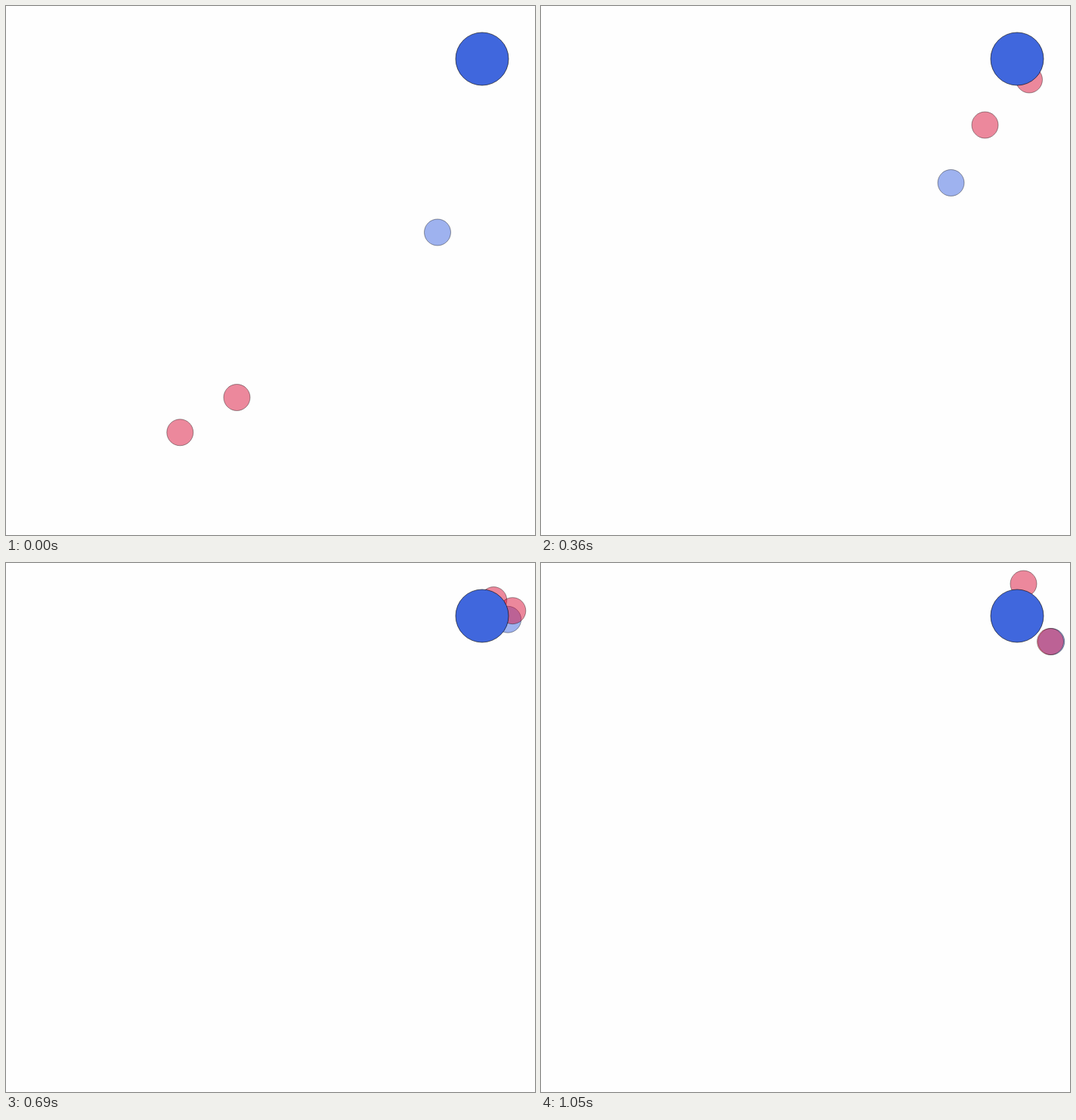
Recreate the animation shown at these times as an HTML page with a canvas. Size 700 by 700 pixels, loop 1080 ms.

```html
<!DOCTYPE html>
<html lang="en">
<head>
<meta charset="utf-8">
<title>Swarm</title>
<style>
html, body { margin: 0; height: 100%; overflow: hidden; background: #fefefe; }
canvas { display: block; }
</style>
</head>
<body>
<canvas id="stage" width="700" height="700"></canvas>
<script>
const ctx = document.getElementById('stage').getContext('2d');
const STEP = 30, LOOP = 1080;
const BLUE = '65,105,225', RED = '220,20,60';

// Key points of each flight, reached at these steps
const steps = [0, 3, 8, 12, 19, 28, 35];
const particles = [
  { color: BLUE, x: [571, 501.5, 457, 542.5, 654, 655.6, 675.3], y: [299.5, 378, 289.5, 234, 91, 89, 104] },
  { color: RED, x: [305.5, 375.5, 511, 646, 669, 613, 638.5], y: [518, 401.5, 219, 97.5, 56, 46, 27.5] },
  { color: RED, x: [230.3, 301.5, 451, 587.5, 683, 638, 674], y: [564.3, 448, 277.5, 157.5, 74.5, 73, 104] }
];

const rate = (p, i) => (p[i + 1] - p[i]) / (steps[i + 1] - steps[i]);

function slope(p, i) {
  if (i === 0) return 2 * rate(p, 0) - slope(p, 1);
  if (i === p.length - 1) return rate(p, i - 1);
  const before = steps[i] - steps[i - 1], after = steps[i + 1] - steps[i];
  return (after * rate(p, i - 1) + before * rate(p, i)) / (before + after);
}

// Cubic Hermite curve through the key points
function glide(p, n) {
  const i = steps.findLastIndex((s, k) => s <= n && k < steps.length - 1);
  const span = steps[i + 1] - steps[i];
  const u = (n - steps[i]) / span, v = 1 - u;
  return v * v * (1 + 2 * u) * p[i] + u * u * (1 + 2 * v) * p[i + 1]
    + span * u * v * (v * slope(p, i) - u * slope(p, i + 1));
}

function disc(x, y, r, fill, line) {
  ctx.beginPath();
  ctx.arc(x, y, r, 0, 2 * Math.PI);
  ctx.fillStyle = fill;
  ctx.fill();
  ctx.strokeStyle = line;
  ctx.stroke();
}

function draw(now) {
  const n = Math.floor((now % LOOP) / STEP);
  ctx.fillStyle = '#fefefe';
  ctx.fillRect(0, 0, 700, 700);
  for (const { color, x, y } of particles) {
    disc(glide(x, n), glide(y, n), 17.5, `rgba(${color},.5)`, 'rgba(0,0,0,.38)');
  }
  disc(630, 70, 35, 'rgb(64,103,221)', 'rgba(0,0,0,.6)');
}

const start = performance.now();
function tick() {
  draw(performance.now() - start);
  requestAnimationFrame(tick);
}
tick();
</script>
</body>
</html>
```
